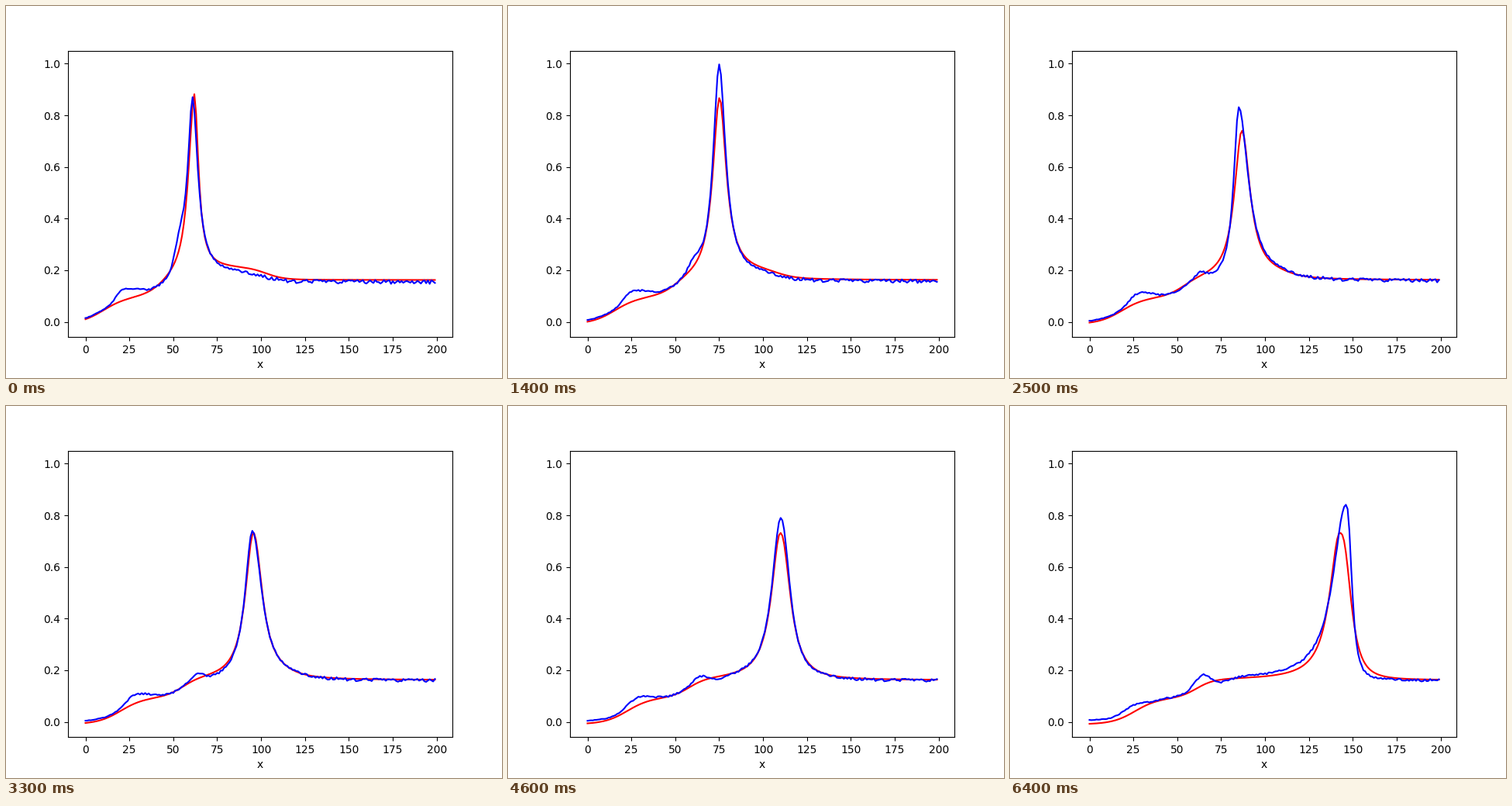
These frames come from a looping animation (640x480 px, 6.5 s). A matplotlib script:

```python
import numpy as np
import matplotlib.pyplot as plt
from matplotlib.animation import FuncAnimation

FRAMES = 65
X = np.arange(200)
NOISE = np.random.default_rng(4).uniform(-1, 1, 400)

# Where the peaks are, and how high the blue one is, at a few times
KEYS = [0, 14, 25, 33, 46, 57, 64]
FIT_X = [62, 75.2, 86.8, 95.6, 109.8, 121, 142.5]
OBS_X = [61, 75, 85, 95, 110, 119, 146]
OBS_Y = [.864, 1, .832, .74, .79, .841, .841]


def sig(x):
    return 1 / (1 + np.exp(-x))


def bump(x0, left, right, height):
    u = X - x0
    return height * np.exp(-.5 * (u / np.where(u < 0, left, right)) ** 2)


def steps(t):
    """Two soft steps that drift to the right and slow down."""
    s = t / 64
    first = sig((X - 10 - 16 * s ** .7) / 6.5)
    second = sig((X - 44 - 17 * s ** .6) / 5)
    return -.011 + .1 * first + .073 * second


def shelf(t):
    """Raised ground right of the peak, fading with time."""
    return .045 * np.exp(-t / 32) * sig((103 + .4 * t - X) / 5)


def peak(base, x0, top, left, right, power):
    """Lorentzian rise on the left, a steeper tail on the right."""
    u = np.abs(X - x0)
    fall = np.where(X < x0, (u / left) ** 2, (u / right) ** power)
    return base + (top - base) / (1 + fall)


def shape(t):
    left = 4 + .045 * t
    right = 7.3 - 4.5 * np.exp(-t / 27)
    power = 2 + .8 * (t / 64) ** 3
    top = .732 + .15 * sig((19 - t) / 2.2)
    return left, right, power, top


def model(t):
    x0 = np.interp(t, KEYS, FIT_X)
    left, right, power, top = shape(t)
    base = steps(t) + np.where(X > x0, shelf(t), 0)
    return peak(base, x0, top, left, right, power)


def measured(t):
    s = t / 64
    x0 = round(np.interp(t, KEYS, OBS_X))
    y0 = np.interp(t, KEYS, OBS_Y)
    left, right, power, top = shape(t)

    # keep the flanks near the model's while the tip moves
    lag = .8 * (np.interp(t, KEYS, FIT_X) - x0)
    thin = np.sqrt((top - .162) / (y0 - .162))
    base = steps(t) + np.where(X > x0, .6 * shelf(t), 0)
    y = peak(base, x0, y0, thin * (left - lag), thin * (right + lag), power)

    ledge = 64 - 10 * np.exp(-t / 12)
    y += bump(0, 14, 14, .005 + .008 * s)
    y += bump(21 + 7 * np.sin(np.pi * t / 75), 3.5 + 2.5 * s, 10 - 4 * s,
              .043 - .02 * s)
    y += bump(ledge, 3 + s, 3 + s,
              .018 + .08 * np.exp(-t / 10) + .02 * s ** 6)
    y -= bump(ledge + 11, 5, 5, .015 * s)
    y -= .008 * np.exp(-t / 40) * sig((X - x0 - 25) / 6)

    u = X - x0
    amp = np.interp(X, [0, 15, 30], [.001, .0015, .0035])
    amp += (.004 - .0025 * s) * np.clip((u - 10) / 35, 0, 1)
    return y + np.where(np.abs(u) < 3, 0, amp) * NOISE[X + 200 - x0]


fig, ax = plt.subplots(figsize=(6.4, 4.8), dpi=100)
ax.set_xlim(-9.95, 208.95)
ax.set_ylim(-.0589, 1.0504)
ax.set_xlabel("x")
fit, = ax.plot(X, model(0), "r")
obs, = ax.plot(X, measured(0), "b")


def update(t):
    fit.set_ydata(model(t))
    obs.set_ydata(measured(t))
    return fit, obs


anim = FuncAnimation(fig, update, frames=FRAMES, interval=100, repeat=True,
                     repeat_delay=0)
plt.show()
```
